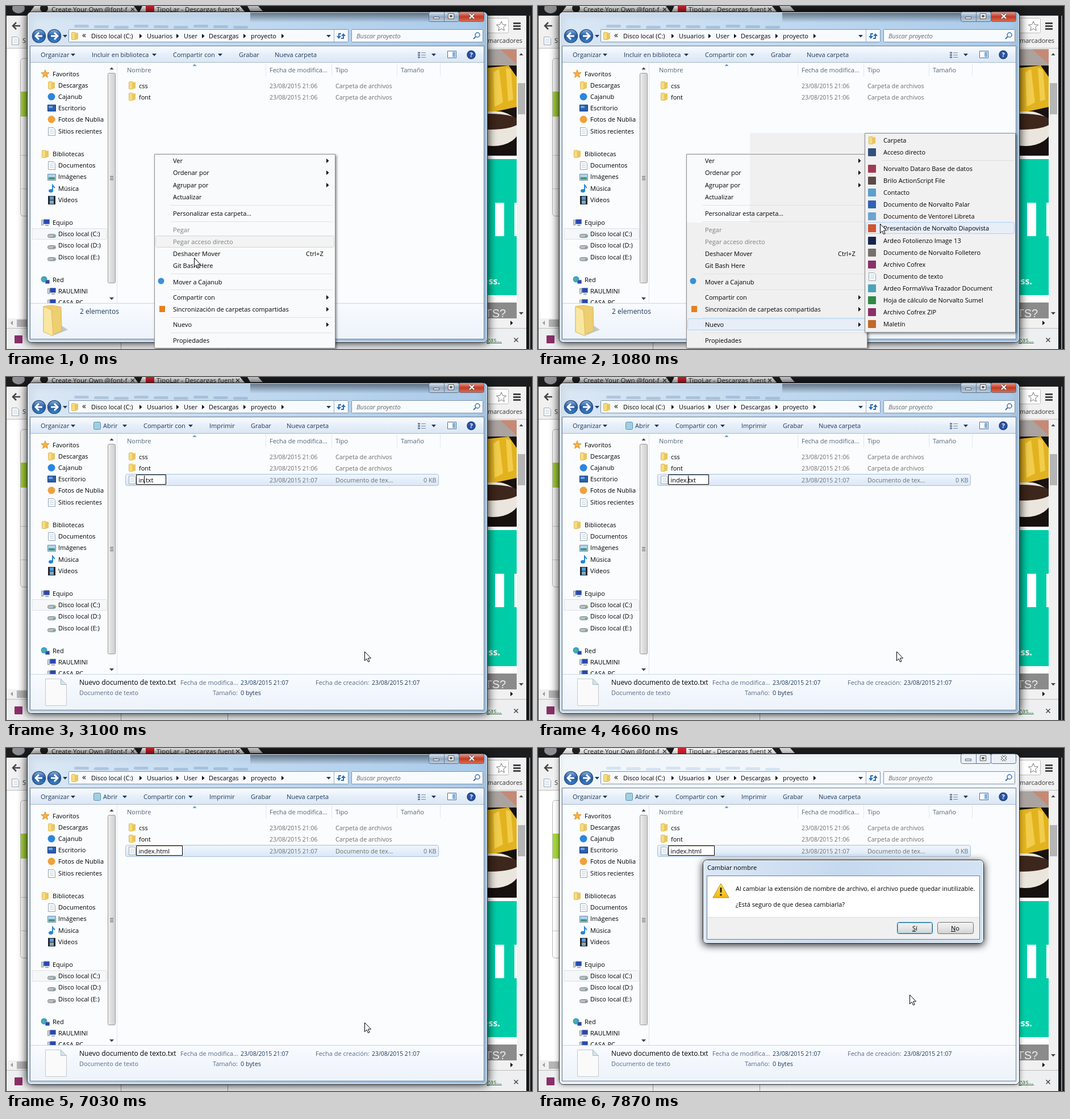
An HTML page with a canvas for the animation above (8 s loop, 926 px wide and 605 px high).

```html
<!DOCTYPE html>
<html lang="es">
<head>
<meta charset="utf-8">
<title>Nuevo documento</title>
<style>
html, body { margin: 0; width: 100%; height: 100%; overflow: hidden; background: #fff; }
canvas { display: block; }
</style>
</head>
<body>
<canvas id="stage" width="926" height="605"></canvas>
<script>
const c = document.getElementById('stage').getContext('2d');
const FONT = '"Open Sans", "Noto Sans", sans-serif';
const LOOP = 8000, NAVY = '#1e395b', GREY = '#6d6d6d';

// time, x, y, menu hover (label y), submenu hover (label y)
const MOUSE = [
  [0, 331, 444, 416], [160, 335, 482, 487], [290, 345, 540, 535], [420, 385, 560, 562],
  [550, 470, 562, 562], [680, 560, 560, 562], [810, 590, 520, 562, 519], [950, 598, 440, 562, 435],
  [1080, 602, 384, 562, 392], [1210, 606, 438, 562, 435], [1340, 612, 499, 562, 498],
  [1500, 622, 536, 562, 540], [1660, 631, 484, 562, 477], [7740, 640, 466], [7870, 654, 435]
];
// time, file name, caret position (-1 hides it)
const TYPING = [
  [2030, 'Nuevo documento de texto.txt', 24], [2590, 'Nuevo documento de texto.txt', -1],
  [2980, 'i.txt', 1], [3100, 'in.txt', 2], [3380, 'inde.txt', 4], [3940, 'inde.txt', -1],
  [4370, 'index.txt', 5], [4660, 'index.txt', 6], [4930, 'index.txt', 7], [5090, 'index.txt', 8],
  [5370, 'index.txt', 9], [5800, 'index.', 6], [5970, 'index.h', 7], [6150, 'index.ht', 8],
  [6320, 'index.htm', 9], [6490, 'index.html', 10], [7030, 'index.html', -1]
];
const MENU = [
  [273, 'Ver', '>'], [294, 'Ordenar por', '>'], [316, 'Agrupar por', '>'], [337, 'Actualizar'],
  [366, 'Personalizar esta carpeta...'], [395, 'Pegar', 'off'], [416, 'Pegar acceso directo', 'off'],
  [437, 'Deshacer Mover'], [458, 'Git Bash Here'], [487, 'Mover a Cajanub'], [514, 'Compartir con', '>'],
  [535, 'Sincronización de carpetas compartidas', '>'], [562, 'Nuevo', '>'], [590, 'Propiedades']
];
const SUBMENU = [
  [237, 'Carpeta'], [258, 'Acceso directo', '#34507e'], [287, 'Norvalto Dataro Base de datos', '#a33a52'],
  [308, 'Brilo ActionScript File', '#5b4a48'], [329, 'Contacto', '#5a9fd0'],
  [350, 'Documento de Norvalto Palar', '#2f62b5'], [371, 'Documento de Ventorel Libreta', '#6aa5cf'],
  [392, 'Presentación de Norvalto Diapovista', '#d2562d'], [414, 'Ardeo Fotolienzo Image 13', '#14264f'],
  [435, 'Documento de Norvalto Folletero', '#77716c'], [456, 'Archivo Cofrex', '#8a2f6a'],
  [477, 'Documento de texto', 'page'], [498, 'Ardeo FormaViva Trazador Document', '#4ba3b8'],
  [519, 'Hoja de cálculo de Norvalto Sumel', '#2f8a45'], [540, 'Archivo Cofrex ZIP', '#8a2f6a'],
  [561, 'Maletín', '#c06a2a']
];
const NAV = [
  [120, 'Favoritos', 'star', 1], [140, 'Descargas', 'folder'], [160, 'Cajanub', '#2b86dc'],
  [180, 'Escritorio', 'screen'], [200, 'Fotos de Nublia', '#f0a03c'], [221, 'Sitios recientes', 'page'],
  [261, 'Bibliotecas', 'folder', 1], [281, 'Documentos', 'page'], [301, 'Imágenes', 'image'],
  [322, 'Música', 'note'], [342, 'Vídeos', 'film'], [382, 'Equipo', 'pc', 1],
  [402, 'Disco local (C:)', 'drive'], [422, 'Disco local (D:)', 'drive'], [443, 'Disco local (E:)', 'drive'],
  [483, 'Red', 'globe', 1], [503, 'RAULMINI', 'pc'], [523, 'CASA-PC', 'pc']
];

const at = (rows, t) => rows.filter(r => r[0] <= t).pop();
function rect(x, y, w, h, fill, line, r = 0) {
  c.beginPath();
  line ? c.roundRect(x + .5, y + .5, w - 1, h - 1, r) : c.roundRect(x, y, w, h, r);
  if (fill) { c.fillStyle = fill; c.fill(); }
  if (line) { c.strokeStyle = line; c.lineWidth = 1; c.stroke(); }
}
function text(s, x, y, color = '#000', size = 11, style = '') {
  c.font = `${style} ${size}px ${FONT}`;
  c.fillStyle = color;
  c.fillText(s, x, y + 4);
}
function poly(points, fill, line) {
  c.beginPath();
  for (let i = 0; i < points.length; i += 2) c.lineTo(points[i], points[i + 1]);
  c.closePath();
  if (fill) { c.fillStyle = fill; c.fill(); }
  if (line) { c.strokeStyle = line; c.lineWidth = 1; c.stroke(); }
}
function path(points, color, width = 1) {
  c.beginPath();
  for (let i = 0; i < points.length; i += 2) c.lineTo(points[i], points[i + 1]);
  c.strokeStyle = color; c.lineWidth = width; c.stroke();
}
function oval(x, y, rx, ry, fill, line) {
  c.beginPath(); c.ellipse(x, y, rx, ry, 0, 0, 7);
  if (fill) { c.fillStyle = fill; c.fill(); }
  if (line) { c.strokeStyle = line; c.lineWidth = 1.5; c.stroke(); }
}
function fade(x0, y0, x1, y1, ...colors) {
  const g = c.createLinearGradient(x0, y0, x1, y1);
  colors.forEach((k, i) => g.addColorStop(i / (colors.length - 1), k));
  return g;
}
const down = (x, y, k = NAVY) => poly([x - 4, y - 2, x + 4, y - 2, x, y + 2.5], k);
const up = (x, y, k = '#444') => poly([x - 3.5, y + 2, x + 3.5, y + 2, x, y - 2], k);
const right = (x, y) => poly([x - 2, y - 4, x + 2.5, y, x - 2, y + 4], '#111');
const cross = (x, y, k, r = 3, w = 1.5) => {
  path([x - r, y - r, x + r, y + r], k, w); path([x + r, y - r, x - r, y + r], k, w);
};
function star(x, y, outer, inner, fill, line) {
  const p = [];
  for (let i = 0; i < 10; i++) {
    const r = i % 2 ? inner : outer, a = i * Math.PI / 5;
    p.push(x + r * Math.sin(a), y - r * Math.cos(a));
  }
  poly(p, fill, line);
}

function icon(kind, x, y) {
  if (kind === 'folder') {
    rect(x - 6, y - 7, 8, 14, '#f5dc82', '#dcb95a', 1);
    poly([x, y - 5, x + 6, y - 6, x + 6, y + 5, x, y + 7], '#eac65c');
  } else if (kind === 'page') {
    poly([x - 5.5, y - 6.5, x + 3.5, y - 6.5, x + 6.5, y - 3.5, x + 6.5, y + 7.5, x - 5.5, y + 7.5], '#f7fafc', '#9aa6b2');
    for (let i = -3; i < 6; i += 3) rect(x - 3, y + i, 7, 1, '#c3d3df');
  } else if (kind === 'star') {
    star(x, y, 7.5, 3, '#fbb33c', '#e08f1e');
  } else if (kind === 'screen') {
    rect(x - 7, y - 6, 15, 12, '#2c5fae', '#1c3a6e');
    rect(x - 5, y - 4, 7, 4, '#6aa1e2');
  } else if (kind === 'image') {
    rect(x - 7, y - 5, 15, 12, '#a9d4f0', '#7a8ea2');
    rect(x - 5, y + 1, 11, 4, '#4f9377');
  } else if (kind === 'note') {
    oval(x - 1, y + 4, 4, 3, '#2385d6');
    path([x + 2, y + 4, x + 2, y - 6, x + 6, y - 1], '#2385d6', 2);
  } else if (kind === 'film') {
    rect(x - 6, y - 7, 13, 15, '#23282e');
    rect(x - 3, y - 6, 7, 6, '#5b9bd0'); rect(x - 3, y + 1, 7, 6, '#7fa8c0');
  } else if (kind === 'pc') {
    rect(x - 7, y - 5, 4, 10, '#d5dbe1', '#8b959f');
    rect(x - 3, y - 6, 11, 9, '#2848b4', '#8391a5');
    rect(x, y + 4, 6, 2, '#a3acb7');
  } else if (kind === 'drive') {
    rect(x - 7, y, 15, 7, '#b7bdc2', '#7d858c', 3);
    rect(x + 3, y + 3, 3, 2, '#4da84d');
  } else if (kind === 'globe') {
    oval(x - 2, y - 1, 5.5, 5.5, '#38a0d8'); oval(x - 3, y - 1, 2, 3, '#5cb85c');
    rect(x, y, 8, 7, '#2848b4', '#8391a5');
  } else rect(x - 7, y - 7, 14, 14, kind, null, 1);
}

function drawBrowser() {
  rect(0, 0, 926, 605, '#fff');
  rect(0, 0, 926, 17, '#1c1d1f');
  oval(22, 4, 11, 9, '#8d8f92');
  poly([38, 17, 50, 0, 225, 0, 238, 17], '#eceded');
  poly([232, 17, 240, 0, 412, 0, 426, 17], '#f1f1f1');
  poly([425, 0, 444, 0, 452, 9, 430, 9], '#d3d4d6');
  oval(67, 4, 7, 7, '#222');
  text('Create Your Own @font-f', 80, 6, '#222', 11.5);
  cross(223, 6, '#444');
  rect(246, 0, 15, 13, '#d3202c');
  text('TipoLar - Descargas fuent', 265, 6, '#222', 11.5);
  cross(408, 6, '#444');

  rect(0, 17, 916, 57, '#f1f1f1');
  path([25, 35, 12, 35], '#444', 2.5); path([18, 29, 12, 35, 18, 41], '#444', 2.5);
  icon('page', 16, 61);
  text('S', 29, 61, '#333');
  rect(830, 21, 55, 27, '#fff', '#bbb', 2);
  star(872, 36, 9, 4, '#fff', '#777');
  for (let y = 29; y < 42; y += 5) rect(893, y, 13, 3, '#444');
  text('marcadores', 848, 61, '#333');
  rect(0, 74, 916, 1, '#bbb');

  rect(25, 92, 60, 279, '#fff', '#b5b5b5', 5);
  rect(26, 151, 20, 44, '#a9d73b');
  rect(26, 263, 12, 1, '#ccc'); rect(26, 322, 12, 1, '#ccc');

  // photo
  rect(840, 76, 59, 188, '#17110f');
  rect(840, 76, 59, 29, '#aaa39f');
  poly([870, 76, 899, 76, 899, 103], '#c58a76');
  poly([840, 110, 885, 105, 899, 125, 899, 178, 840, 191], '#e2b31f');
  poly([858, 117, 868, 111, 875, 170, 860, 178], '#f2cd4c');
  poly([880, 109, 889, 112, 893, 165, 884, 168], '#f2cd4c');
  c.save();
  c.beginPath(); c.rect(840, 186, 59, 78); c.clip();
  oval(858, 216, 46, 31, '#ebe6dd');
  oval(852, 204, 52, 14, '#3d261b');
  c.restore();

  rect(840, 270, 59, 240, '#00cda7');
  rect(861, 347, 16, 59, '#fff'); rect(895, 347, 4, 59, '#fff');
  text('ess.', 840, 487, '#fff', 16, 'bold');
  rect(840, 523, 59, 28, '#8b8b8b');
  c.font = '20px "Liberation Sans", sans-serif';
  c.fillStyle = '#eee'; c.fillText('ITS?', 838, 549);

  rect(899, 75, 17, 476, '#f1f1f1');
  up(907, 85); down(907, 542, '#444');
  rect(901, 136, 13, 55, '#b5b5b5');
  rect(1, 551, 915, 17, '#f1f1f1');
  poly([12, 555, 12, 563, 8, 559], '#999'); right(890, 559);
  rect(19, 553, 30, 13, '#b5b5b5');
  rect(0, 568, 916, 37, '#eeeff0'); rect(0, 568, 916, 1, '#bbb');
  icon('#8a2f6a', 22, 588);
  rect(202, 594, 1, 11, '#999'); rect(390, 594, 1, 11, '#999');
  text('gas...', 846, 589, '#2b6a3c'); rect(846, 594, 27, 1, '#2b6a3c');
  cross(898, 589, '#444', 3.5, 1.5);
  rect(0, 17, 1, 588, '#333');
  rect(916, 17, 10, 588, '#161719'); rect(921, 17, 2, 588, '#8c8e90');
}

function drawFrame(active) {
  c.save();
  c.shadowColor = active ? 'rgba(0,0,0,.9)' : 'rgba(0,0,0,.4)';
  c.shadowBlur = active ? 16 : 8;
  const glass = fade(37, 10, 848, 100, '#dbe8f5', '#bfd8ef', '#a9cae9');
  rect(37, 10, 811, 584, active ? glass : '#f1f6fb', '#20262d', 7);
  c.restore();
  if (active) rect(430, 11, 412, 18, fade(0, 11, 0, 29, 'rgba(25,35,48,.55)', 'rgba(25,35,48,0)'));
  rect(38, 11, 809, 582, null, 'rgba(255,255,255,.75)', 6);
  c.save();
  c.globalAlpha = active ? .35 : .55;
  for (let i = 0; i < 9; i++) rect(120 + i * 35, 33 + i % 3, 26, 5, active ? '#6f8cae' : '#b9d3ec', null, 3);
  c.restore();
  rect(744, 10, 54, 18, active ? fade(0, 10, 0, 28, '#dce7f2', '#93a9c1', '#bdd0e4') : '#e9f0f7', '#5f6f82', 3);
  rect(797, 10, 45, 18, active ? fade(0, 10, 0, 28, '#e3a296', '#c33a25', '#d97056') : '#e9f0f7', '#5f6f82', 3);
  rect(771, 11, 1, 16, '#6b7c90');
  rect(752, 19, 11, 4, '#fff', '#555');
  rect(778, 13, 11, 10, '#fff', '#555'); rect(781, 16, 5, 4, '#777', '#555');
  cross(820, 18, '#555', 4, 4); cross(820, 18, '#fff', 4, 2.2);

  for (const x of [58, 85]) {
    oval(x, 53, 11.5, 11.5, fade(0, 41, 0, 65, '#88b6e8', '#23579f', '#3b8ad4'), '#31527e');
    const d = x === 58 ? -1 : 1;
    path([x - 6 * d, 53, x + 5 * d, 53], '#fff', 3);
    path([x, 47, x + 6 * d, 53, x, 59], '#fff', 3);
  }
  down(104, 53);
  rect(110, 41, 493, 23, '#f8fbfe', '#7d91aa', 1);
  rect(577, 42, 1, 21, '#9fb1c6');
  icon('folder', 121, 53);
  text('«', 134, 52, '#000', 14);
  [['Disco local (C:)', 150], ['Usuarios', 248], ['User', 313], ['Descargas', 357], ['proyecto', 431]]
    .forEach(([s, x]) => text(s, x, 53));
  [237, 302, 347, 420, 487].forEach(x => right(x, 53));
  down(568, 53);
  path([586, 55, 586, 49, 590, 49], '#2e6fb5', 2); poly([582, 53, 590, 53, 586, 58], '#2e6fb5');
  path([594, 51, 594, 57, 590, 57], '#2e6fb5', 2); poly([590, 53, 598, 53, 594, 48], '#2e6fb5');
  rect(608, 41, 232, 23, '#f8fbfe', '#7d91aa', 1);
  text('Buscar proyecto', 617, 53, '#666', 11, 'italic');
  oval(830, 51, 4, 4, null, '#3a70b0'); path([827, 54, 823, 58], '#3a70b0', 2);
}

function drawExplorer(file, newBar) {
  rect(42, 70, 800, 518, '#fafcfe', '#64798f');
  rect(43, 71, 798, 29, fade(0, 71, 0, 100, '#f9fcff', '#e6eff9', '#dae6f3'));
  rect(43, 99, 798, 1, '#a9b9cc');
  const bar = newBar
    ? [['Organizar', 61, 118], ['Abrir', 171, 209], ['Compartir con', 242, 325], ['Imprimir', 358], ['Grabar', 431], ['Nueva carpeta', 494]]
    : [['Organizar', 61, 118], ['Incluir en biblioteca', 151, 261], ['Compartir con', 294, 377], ['Grabar', 410], ['Nueva carpeta', 473]];
  for (const [s, x, arrow] of bar) { text(s, x, 86, NAVY); if (arrow) down(arrow, 86); }
  if (newBar) rect(154, 79, 13, 14, '#9fd0e2', '#5d8fae', 2);
  for (let y = 81; y < 92; y += 4) { rect(725, y, 4, 3, '#73879e'); rect(731, y + 1, 8, 1, '#73879e'); }
  down(753, 86);
  rect(777, 79, 16, 13, '#fff', '#4e6b8c'); rect(786, 81, 5, 9, '#7fb2dd');
  oval(819, 86, 7, 7, '#2a55a8', '#1e3d7a'); text('?', 816.5, 86, '#fff', 11, 'bold');

  c.save();
  c.beginPath(); c.rect(43, 100, 152, 424); c.clip();
  rect(45, 392, 133, 20, '#f5f7f9', '#dde1e5', 2);
  for (const [y, s, kind, top] of NAV) {
    if (kind === '#2b86dc' || kind === '#f0a03c') oval(80, y, 6.5, 6.5, kind);
    else icon(kind, top ? 69 : 80, y);
    text(s, top ? 82 : 92, y);
  }
  up(186, 110); down(186, 516, '#444');
  rect(179, 118, 14, 371, fade(179, 0, 193, 0, '#f2f2f2', '#dcdcdc', '#cfcfcf'), '#979797', 2);
  for (let y = 300; y < 308; y += 3) rect(183, y, 6, 1, '#555');
  c.restore();
  rect(195, 100, 1, 425, '#dbe6f2');

  [['Nombre', 213], ['Fecha de modifica...', 464], ['Tipo', 580], ['Tamaño', 695]].forEach(([s, x]) => text(s, x, 113, '#566679'));
  [457, 573, 688, 764].forEach(x => rect(x, 101, 1, 23, '#e2e8f0'));
  up(332, 104, '#6f9ec0');
  if (file) rect(210, 171, 552, 21, fade(0, 171, 0, 192, '#f0f6fd', '#d9e7f8'), '#a6bfdd', 3);
  const rows = [[141, 'css', '6', 'Carpeta de archivos'], [161, 'font', '6', 'Carpeta de archivos']];
  if (file) rows.push([182, '', '7', 'Documento de tex...']);
  for (const [y, name, minute, type] of rows) {
    icon(name ? 'folder' : 'page', 222, y - 1);
    text(name, 234, y);
    text('23/08/2015 21:0' + minute, 464, y, GREY, 10.4);
    text(type, 580, y, GREY, 10.8);
  }
  if (file) text('0 KB', 735, 182, GREY, 10.8);

  rect(43, 525, 798, 62, fade(0, 525, 0, 587, '#f8fbff', '#edf3fa'));
  rect(43, 524, 798, 1, '#c9d7e6');
  if (!file) {
    poly([98, 564, 109, 571, 84, 581], 'rgba(90,90,80,.3)');
    poly([66, 530, 80, 528, 97, 531, 98, 573, 82, 580, 66, 575], '#edce70', '#d9b95c');
    poly([66, 530, 80, 536, 83, 582, 66, 575], '#f9e7a1', '#dcbc62');
    text('2 elementos', 130, 539, NAVY, 12);
  } else {
    poly([69.5, 532.5, 96.5, 532.5, 106.5, 542.5, 106.5, 579.5, 69.5, 579.5], '#fafafa', '#c3c9cf');
    poly([96.5, 532.5, 106.5, 542.5, 96.5, 542.5], '#d5e3ec', '#a9b9c6');
    text('Nuevo documento de texto.txt', 129, 539, '#000', 12);
    text('Documento de texto', 129, 557, '#5a6b85', 10.9);
    [['Fecha de modifica...', 307, 539], ['Tamaño:', 364, 557], ['Fecha de creación:', 545, 539]]
      .forEach(([s, x, y]) => text(s, x, y, '#5a6b85'));
    text('23/08/2015 21:07', 413, 539, NAVY, 10.4);
    text('0 bytes', 413, 557, NAVY, 10.8);
    text('23/08/2015 21:07', 644, 539, NAVY, 10.4);
  }
}

function drawRename(name, caret, selected) {
  c.font = '11px ' + FONT;
  const end = n => Math.round(233.5 + c.measureText(name.slice(0, n)).width);
  rect(229, 172, end(name.length) + 23 - 229, 18, '#fff', '#000');
  text(name, 233.5, 182);
  if (selected) {
    rect(233, 174, end(24) - 233, 15, '#3399ff');
    text(name.slice(0, 24), 233.5, 182, '#fff');
  }
  if (caret >= 0) rect(end(caret), 174, 1, 14, '#000');
}

const hoverBox = (x, y, w, dim) => rect(x, y - 10.5 | 0, w, 21, dim ? '#f3f3f3' : '#e7eef8', dim ? '#d5d5d5' : '#aecff7', 3);

function panel(x, y, w, h, fill) {
  c.save();
  c.shadowColor = 'rgba(0,0,0,.45)'; c.shadowBlur = 4; c.shadowOffsetX = c.shadowOffsetY = 2;
  rect(x, y, w, h, fill);
  c.restore();
}

function drawMenus(hover, subHover, open) {
  panel(261, 261, 319, 343, '#f9fafb');
  if (open) { rect(373, 224, 202, 158, '#f0f0f0'); rect(262, 382, 317, 221, '#f0f0f0'); }
  rect(261, 261, 319, 343, null, '#8c8c8c');
  [351, 380, 472, 500, 549, 576].forEach(y => rect(290, y, 285, 1, '#e1e1e1'));
  hoverBox(263, hover, 315, hover === 416);
  for (const [y, s, flag] of MENU) {
    text(s, 294, y, flag === 'off' ? '#7d7d7d' : '#000');
    if (flag === '>') right(566, y);
  }
  text('Ctrl+Z', 528, 437);
  oval(273, 485, 5.5, 5.5, '#3a8fd8');
  rect(270, 529, 10, 11, '#e6801f');
  if (!open) return;
  panel(575, 224, 266, 352, '#f1f1f1');
  rect(575, 224, 266, 352, null, '#8c8c8c');
  rect(605, 272, 233, 1, '#dedede');
  if (subHover) hoverBox(577, subHover, 262);
  for (const [y, s, kind = 'folder'] of SUBMENU) { icon(kind, 588, y); text(s, 608, y); }
}

function drawDialog(fresh) {
  c.save();
  if (fresh) { c.translate(537, 271); c.scale(.963, .95); c.translate(-537, -271); }
  c.save();
  c.shadowColor = fresh ? 'rgba(0,0,0,.5)' : 'rgba(0,0,0,.85)';
  c.shadowBlur = fresh ? 9 : 14; c.shadowOffsetY = 3;
  rect(290, 197, 495, 148, '#fff', null, 7);
  c.restore();
  if (fresh) c.globalAlpha = .6;
  rect(290, 197, 495, 148, fade(290, 197, 785, 225, '#dbe8f6', '#c5d9ef', '#d3e3f4'), '#20262d', 7);
  rect(291, 198, 493, 146, null, 'rgba(255,255,255,.8)', 6);
  text('Cambiar nombre', 298, 211);
  rect(297, 225, 481, 113, '#fff', '#6c7c8e');
  rect(298, 298, 479, 39, '#f0f0f0'); rect(298, 298, 479, 1, '#dfdfdf');
  c.lineJoin = 'round';
  poly([322, 239, 336, 264, 308, 264], fade(0, 239, 0, 264, '#ffe55c', '#f3b70c'), '#b98d1a');
  rect(320.5, 246, 3, 9, '#222', null, 1); oval(322, 259, 1.8, 1.8, '#222');
  text('Al cambiar la extensión de nombre de archivo, el archivo puede quedar inutilizable.', 348, 248, '#000', 10.9);
  text('¿Está seguro de que desea cambiarla?', 348, 276, '#000', 10.9);
  const face = fade(0, 307, 0, 328, '#f4f4f4', '#e6e6e6', '#d0d0d0');
  rect(632, 307, 63, 21, face, '#2c628b', 3); rect(633, 308, 61, 19, null, '#4cc3ee', 2);
  rect(703, 307, 64, 21, face, '#707070', 3);
  text('Sí', 659, 318); rect(659, 323, 6, 1, '#000');
  text('No', 727, 318); rect(727, 323, 8, 1, '#000');
  c.restore();
}

function drawCursor(x, y) {
  c.save();
  c.translate(x + .5, y + .5);
  poly([0, 0, 0, 16, 3.5, 12.5, 6, 18, 8.5, 17, 6, 11.5, 11, 11.5], '#fff', '#000');
  c.restore();
}

function draw(t) {
  const [, x, y, hover, subHover] = at(MOUSE, t);
  const typing = at(TYPING, t);
  drawBrowser();
  drawFrame(t < 7480);
  drawExplorer(!!typing, t >= 2300);
  if (typing) drawRename(typing[1], typing[2], t < 2980);
  else drawMenus(hover, subHover, t >= 680);
  if (t >= 2030 && t < 2300) {
    c.globalAlpha = t < 2160 ? .75 : .35;
    rect(577, 467, 262, 21, '#f7f8fa', '#c9ced6', 3);
    icon('page', 588, 477);
    text('Documento de texto', 608, 477);
    c.globalAlpha = 1;
  }
  if (t >= 7480) drawDialog(t < 7610);
  drawCursor(x, y);
}

function frame() {
  draw(performance.now() % LOOP);
  requestAnimationFrame(frame);
}
frame();
</script>
</body>
</html>
```
